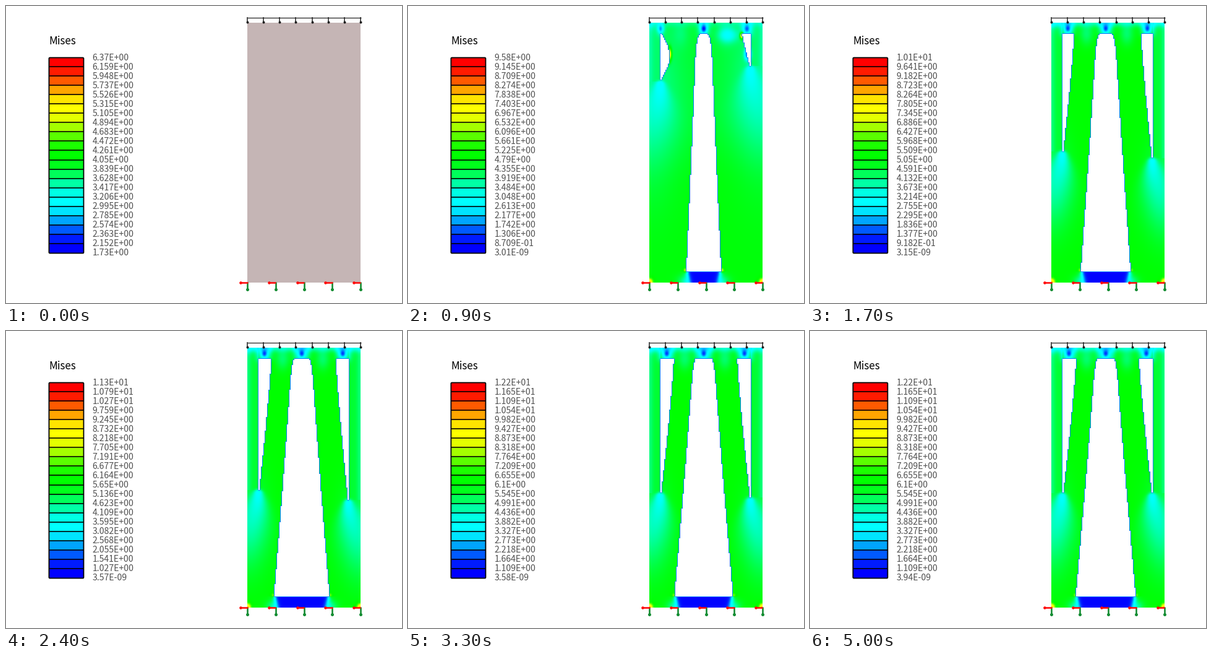
A matplotlib script that plays this animation: 640 px wide and 480 px high, repeating every 5.1 s.

```python
import numpy as np
import matplotlib.pyplot as plt
from matplotlib.animation import FuncAnimation
from matplotlib.patches import Rectangle, FancyBboxPatch

W, H, DPI = 640, 480, 100
FRAMES, INTERVAL = 51, 100
PX = 72 / DPI
FONT = "Noto Sans CJK JP"

# Plate edges, the solid layers above and below the holes, the hole walls
X0, X1, Y0, Y1 = 390, 573, 27, 447
ROOF, FLOOR = 45, 429
MID, SIDE_L, SIDE_R = 478, 407, 555
CELLS = 21

col, row = np.arange(X1 - X0), np.arange(Y1 - Y0)
X, Y = np.meshgrid(X0 + 0.5 + col, Y0 + 0.5 + row)
# Centres of the 2 px elements that give the holes stepped edges
XE, YE = np.meshgrid(X0 + 1 + col // 2 * 2, Y0 + 1 + row // 2 * 2)


def clip01(v):
    return np.clip(v, 0, 1)


def smooth(v):
    v = clip01(v)
    return v * v * (3 - 2 * v)


def settle(f, start, scale, power=1.0):
    """Rise from 0 at start towards 1."""
    return 1 - np.exp(-(max(f - start, 0) / scale) ** power)


def bell(x, y, rx, ry):
    return np.exp(-((X - x) / rx) ** 2 - ((Y - y) / ry) ** 2)


def inside(dist, soft):
    return 1 / (1 + np.exp(np.clip(dist / soft, -40, 40)))


def rainbow(t):
    """Blue, cyan, green, yellow, red for t from 0 to 1."""
    v = np.asarray(t) * CELLS - 0.5
    return np.stack([smooth((v - 10) / 5),
                     smooth(v / 5) * smooth((20 - v) / 5),
                     smooth((10 - v) / 5)], axis=-1)


class Shape:
    """Outline of the three holes at one frame."""

    def __init__(self, f):
        self.grow = settle(f, 9, 9)
        self.high = clip01((396 - 39 * f - ROOF) / 60)
        self.peak = clip01(1 - abs(f - 9) / 4)
        self.top = max(ROOF, 396 - 39 * f)
        self.foot = 28 + 20.5 * self.grow
        self.low_l = ROOF + 217 * settle(f, 6, 6, 1.2)
        self.low_r = (ROOF + 230 * settle(f, 6, 7, 1.6)
                      - 13 * clip01((f - 24) / 20))

    def core(self, y):
        """Half width of the centre hole."""
        s = clip01((y - self.top) / (FLOOR - self.top))
        d = np.clip(y - self.top, 0, None)
        neck = 12 + 5 * self.grow
        half = neck + (self.foot - neck) * s ** 1.1
        half += 5 * self.high * np.cos((d - 20) * np.pi / 50) * np.exp(-d / 120)
        cap = 0.46 - 0.28 * self.grow + 0.25 * self.high
        return half * (1 - cap * np.exp(-d / (12 - 4 * self.high)))

    def side(self, y, low, lens=0):
        """Width of a side hole; lens bends it into a bow."""
        s = clip01((y - ROOF) / max(low - ROOF, 1))
        wide = 2 + (12.5 + 8.5 * self.grow) * (1 - s ** 1.2)
        bow = 14 * np.sin(np.pi * s) + 3 * (1 - s)
        return wide + (bow - wide) * lens

    def holes(self):
        mask = ((YE > self.top) & (YE < FLOOR)
                & (abs(XE - MID) < self.core(YE)))
        for low, lens, dist in ((self.low_l, self.peak, XE - SIDE_L),
                                (self.low_r, 0, SIDE_R - XE)):
            mask |= ((YE > ROOF) & (YE < low) & (dist > 0)
                     & (dist < self.side(YE, low, lens)))
        return mask


def stress(f):
    """Stress relative to the maximum, and the mask of the holes."""
    shape = Shape(f)
    holes = shape.holes()
    top, high, peak = shape.top, shape.high, shape.peak
    late = clip01((f - 4) / 13)
    opened = clip01((f - 6) / 4)
    in_l = SIDE_L + shape.side(ROOF, shape.low_l, peak)
    in_r = SIDE_R - shape.side(ROOF, shape.low_r)
    brow = shape.core(top)

    t = 0.405 + 0.06 * smooth((Y - 150) / 150)
    t += (0.492 - t) * late

    # Unloaded plume and loaded shoulders around the growing centre hole
    d = np.clip(top - Y, 0, None)
    plume = np.exp(-((X - MID) / (12 + 0.25 * d)) ** 2 - d / 85)
    t -= high * (0.2 * plume * smooth((top + 6 - Y) / 12)
                 + 0.2 * bell(MID - 1, top - 10, 4, 9))
    for sign in (-1, 1):
        t += high * (0.06 * bell(MID + sign * 40, top + 5, 32, 26)
                     + 0.22 * bell(MID + sign * 19, top + 22, 4, 9))

    # Roof over each hole, with a dark spot at mid span
    for a, b, amount in ((MID - brow, MID + brow, 1 - high),
                         (SIDE_L, in_l, opened), (in_r, SIDE_R, opened)):
        mid, half = (a + b) / 2, (b - a) / 2
        span = inside(abs(X - mid) - half, 3) * inside(Y - ROOF - 3, 3)
        t -= amount * (0.19 * span + 0.2 * bell(mid, 37, 5, 6))

    # Heads of the two legs and the top edge
    for x in ((in_l + MID - brow) / 2, (in_r + MID + brow) / 2):
        t -= 0.1 * late * bell(x, 44, 13, 22)
    t -= 0.11 * late * np.exp(-((Y - Y0) / 7) ** 2)
    t -= 0.04 * bell(X0, Y0, 12, 12)

    # Outer struts and the shadow below each side hole
    for x, wall, low, strut in (
            (SIDE_L + 1, X0, shape.low_l, X < SIDE_L + 1),
            (SIDE_R - 2, X1, shape.low_r, X > SIDE_R - 1)):
        strut = strut & (Y < low)
        t -= opened * strut * (0.06 + 0.05 * np.exp(-((X - wall) / 6) ** 2))
        d = np.clip(Y - low, 0, None)
        fan = np.exp(-((X - x) / (6 + 0.4 * d)) ** 2 - d / 45)
        t -= opened * 0.18 * fan * smooth((Y - low + 5) / 10)
        shade = bell(wall, low + 50, 36 + 14 * peak, 90 + 60 * peak)
        t -= opened * 0.11 * shade * ~strut

    # Short-lived peaks while the side holes form
    t += peak * (0.35 * bell(SIDE_L + 16, 78, 3, 10)
                 + 0.4 * bell(in_r - 1, 48, 3, 5)
                 - 0.12 * bell(in_r - 23, 47, 16, 12)
                 - 0.3 * bell(SIDE_R - 6, 78, 5, 9))

    # Idle block below the centre hole
    dist = abs(X - MID) - shape.foot + (Y - FLOOR) * 0.35
    t -= 0.18 * np.exp(-(np.clip(dist, 0, None) / 17) ** 2
                       - ((Y1 - Y) / 11) ** 2)
    t += (0.04 - t) * inside(dist, 2.5) * (Y > FLOOR)

    # Hot corners
    for sign, wall in ((-1, X0), (1, X1)):
        foot = MID + sign * (shape.foot + 1)
        t += (0.25 - 0.12 * late) * bell(foot, FLOOR - 2, 4, 4)
        t += 0.35 * bell(wall, Y1, 6, 7)

    # Nearly void elements along the hole edges
    near = np.zeros_like(holes)
    for axis in (0, 1):
        for step in (-1, 1):
            near |= np.roll(holes, step, axis)
    t[near & ~holes] = 0.14
    return clip01(t), holes


def plate(f):
    if f == 0:
        return np.full(X.shape + (3,), [197 / 255, 181 / 255, 181 / 255])
    t, holes = stress(f)
    img = rainbow(t)
    img[holes] = 1
    return img


def number(v, digits=3):
    mantissa, power = f"{v:.{digits}E}".split("E")
    return mantissa.rstrip("0").rstrip(".") + "E" + power


def legend(f):
    times = [0, 4, 9, 17, 24, 33, 50]
    peak = np.interp(f, times, [6.37, 7.91, 9.58, 10.1, 11.3, 12.2, 12.2])
    void = np.interp(f, times, [1.54, 1.54, 3.01, 3.15, 3.57, 3.58, 3.94])
    peak = float(f"{peak:.3g}")
    least = 1.73 if f == 0 else void * 1e-9
    step = (peak - least) / (CELLS + 1)
    return [number(peak - i * step) for i in range(CELLS)] + [number(least, 2)]


fig = plt.figure(figsize=(W / DPI, H / DPI), dpi=DPI, facecolor="white")
ax = fig.add_axes([0, 0, 1, 1])
body = ax.imshow(plate(0), extent=(X0, X1, Y1, Y0), interpolation="nearest",
                 aspect="auto", zorder=1)
ax.set_xlim(0, W)
ax.set_ylim(H, 0)
ax.axis("off")


def line(xs, ys, color, width):
    ax.plot(xs, ys, color=color, lw=width * PX, solid_capstyle="butt", zorder=3)


def dot(x, y, color, size):
    ax.plot([x], [y], "o", color=color, ms=size * PX, mew=0, zorder=4)


# Colour bar
ax.text(69, 62.5, "Mises", family=FONT, size=17 * PX, color="black")
cell = (399 - 83) / CELLS
for i in range(CELLS):
    y = 83 + i * cell
    ax.add_patch(Rectangle((69.5, y + 0.5), 56, cell, ec="none",
                           fc=rainbow((CELLS - i - 0.5) / CELLS)))
    if i:
        line([69, 126], [round(y)] * 2, "black", 1.6)
ax.add_patch(FancyBboxPatch((69.5, 83.5), 56, 316, fc="none", ec="black",
                            boxstyle="round,pad=0,rounding_size=1.5",
                            lw=1.8 * PX, zorder=3))
labels = [ax.text(139.5, 88 + 15 * i, "", family=FONT, weight="light",
                  size=14.1 * PX, color="#505050") for i in range(CELLS + 1)]

# Pressure load
INK = "#1e1e1e"
line([X0 - 0.5, X1 + 0.5], [18.5, 18.5], INK, 1.2)
for x in np.linspace(X0, X1, 8):
    line([x, x], [18, 27], INK, 1.5)
    dot(x, 26, INK, 4)

# Supports
RED, GREEN = "#ff0a0a", "#148c32"
for x in np.linspace(390.3, 572.7, 5):
    line([x, x], [446, 459], GREEN, 2.6)
    dot(x, 458, GREEN, 5)
    line([x - 12, x + 0.5], [446.7, 446.7], RED, 2.6)
    dot(x - 11, 446.7, RED, 4.6)


def draw(f):
    body.set_data(plate(f))
    for label, text in zip(labels, legend(f)):
        label.set_text(text)
    return [body, *labels]


anim = FuncAnimation(fig, draw, frames=FRAMES, interval=INTERVAL,
                     repeat=True, repeat_delay=0)
plt.show()
```
